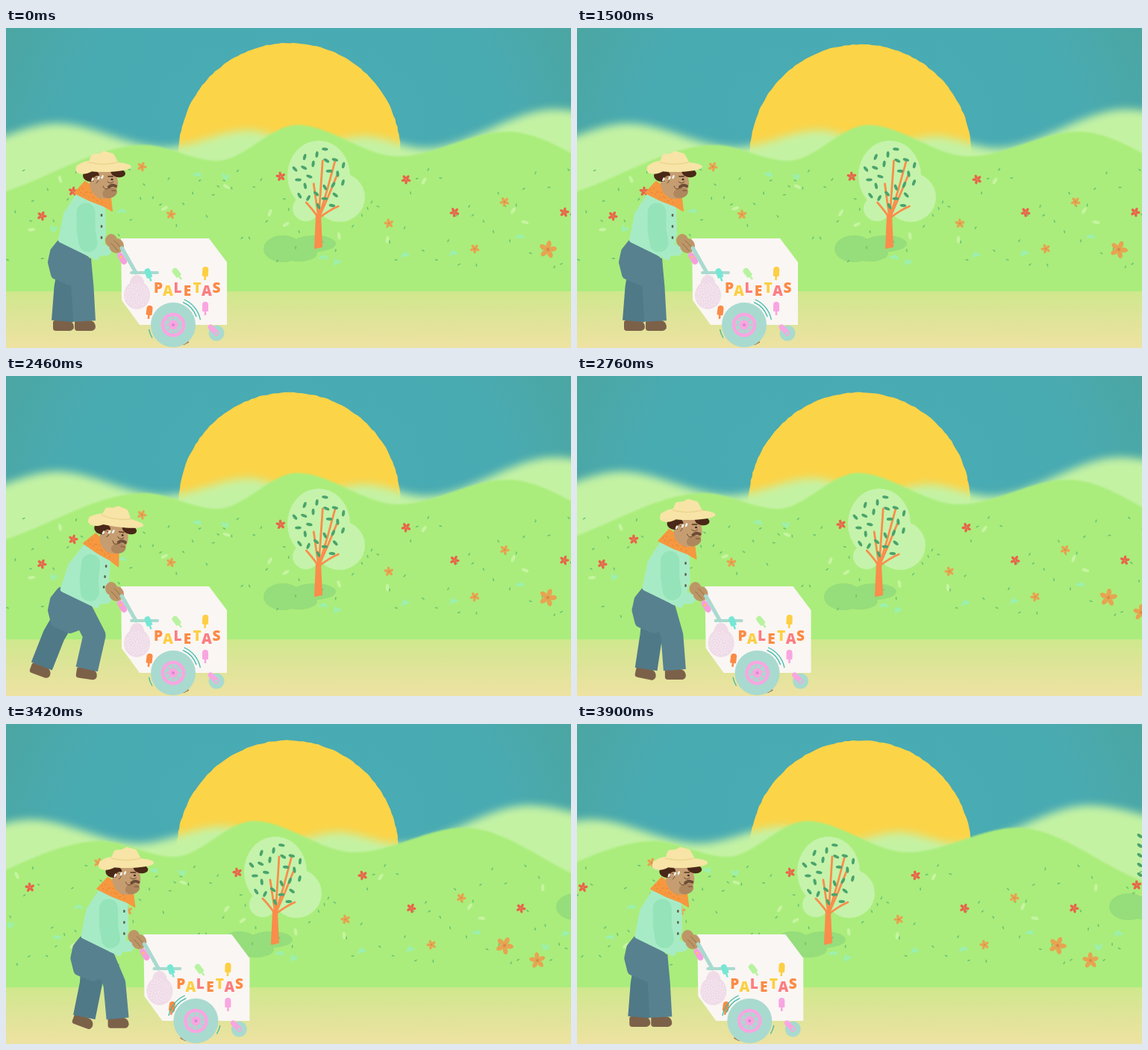
These frames come from a looping animation (757x429 px, 3960 ms). An HTML page with a canvas:

```html
<!DOCTYPE html>
<html lang="es">
<head>
<meta charset="utf-8">
<title>Paletas</title>
<style>
html, body { margin: 0; width: 100%; height: 100%; overflow: hidden; background: #4aabb1 }
canvas { display: block }
</style>
</head>
<body>
<canvas id="stage" width="757" height="429"></canvas>
<script>
const W = 757, H = 429, GROUND = 353, LOOP = 3960, START = 2520;
const c = document.getElementById('stage').getContext('2d');
const mix = (a, b, k) => a + (b - a) * k;
const clamp = k => Math.max(0, Math.min(1, k));
const smooth = k => k * k * (3 - 2 * k);
const ramp = (t, a, b) => smooth(clamp((t - a) / (b - a)));
const rnd = n => { const s = Math.sin(n * 127.1 + 11.7) * 43758.5453; return s - Math.floor(s); };

// Value at x on a line through [x, value] keys
function along(x, keys, ease = k => k) {
  const i = Math.max(1, keys.findIndex(k => k[0] > x));
  const [a, b] = [keys[i - 1], keys[i]];
  return mix(a[1], b[1], ease(clamp((x - a[0]) / (b[0] - a[0]))));
}

function fill(color) { c.fillStyle = color; c.fill(); }
function stroke(color, width, cap = 'round') {
  c.strokeStyle = color; c.lineWidth = width; c.lineCap = cap; c.lineJoin = 'round';
  c.stroke();
}
function trace(pts) { c.beginPath(); pts.forEach(p => c.lineTo(...p)); }
function poly(color, pts, round = 0) {
  trace(pts);
  c.closePath();
  fill(color);
  if (round) stroke(color, round);
}
function line(color, width, pts, cap) { trace(pts); stroke(color, width, cap); }
function bend(color, width, a, mid, b) {
  c.beginPath();
  c.moveTo(...a);
  c.quadraticCurveTo(...mid, ...b);
  stroke(color, width);
}
function oval(color, x, y, rx, ry = rx, rot = 0) {
  c.beginPath();
  c.ellipse(x, y, rx, ry, rot, 0, 7);
  fill(color);
}
function arc(color, width, r, a = 0, b = 7) { c.beginPath(); c.arc(0, 0, r, a, b); stroke(color, width); }
function group(x, y, rot, draw) { c.save(); c.translate(x, y); c.rotate(rot); draw(); c.restore(); }
function shade(gradient, ...colors) {
  colors.forEach((k, i) => gradient.addColorStop(i / (colors.length - 1), k));
  return gradient;
}

// Crests and valleys of the two ranges
const FRONT = [[-60, 230], [185, 157], [283, 178], [390, 130], [525, 172], [672, 139], [880, 218]];
const BACK = [[-80, 165], [68, 128], [212, 160], [325, 137], [405, 158], [480, 145], [562, 161], [735, 109], [900, 140]];
const RED = [[48, 252], [90, 219], [368, 199], [536, 203], [601, 247], [748, 247], [832, 216]];
const ORANGE = [[182, 186], [221, 250], [513, 262], [628, 296], [668, 233], [726, 297, 11], [770, 317, 10]];

function hills(keys, shift, color, blur) {
  c.filter = `blur(${blur}px)`;
  c.beginPath();
  for (let x = -40; x <= W + 40; x += 4) c.lineTo(x, along(x + shift, keys, smooth));
  c.lineTo(W + 40, H + 20);
  c.lineTo(-40, H + 20);
  fill(color);
  c.filter = 'none';
}

function flower(color, x, y, r, rot) {
  group(x, y, rot, () => {
    for (let i = 0; i < 5; i++) {
      const a = i * Math.PI * .4;
      oval(color, Math.cos(a) * r * .6, Math.sin(a) * r * .6, r * .5, r * .3, a);
    }
    oval('#d98a4c', 0, 0, r * .2);
  });
}

function bush(x, y) {
  const color = '#96dd7b';
  oval(color, x - 22, y, 26, 18);
  oval(color, x, y + 6, 24, 11);
  oval(color, x + 20, y - 7, 29, 11);
}

function tree(step) {
  const bark = '#fa8d4b', pale = '#c5f3ab', sway = rnd(step) - .5;
  oval(pale, 419, 198, 42, 47);
  oval(pale, 447, 227, 34, 33);
  oval(pale, 402, 242, 18, 17);
  poly(bark, [[414, 295], [416, 250], [421, 250], [423, 293]], 2);
  [[402, 234], [412, 209], [424, 178], [441, 177], [443, 198], [445, 239]].forEach(([x, y]) =>
    bend(bark, 2.8, [419, 255], [mix(419, x, .55), mix(248, y, .45)], [x + sway, y]));
  // Leaves spread by the golden angle
  for (let i = 3; i < 27; i++) {
    const a = i * 2.4, r = Math.sqrt(i / 27);
    oval('#4aa36d', 420 + Math.cos(a) * 36 * r, 202 + Math.sin(a) * 44 * r, 4.3, 2, .9 + Math.sin(i) + rnd(step + i) * .2);
  }
}

function meadow(shift, step) {
  const scatter = (n, seed, draw) => {
    for (let i = 0; i < n; i++)
      draw((i + rnd(seed + i)) * 870 / n, 188 + rnd(seed + 99 + i) * 135, rnd(seed + 200 + i) * 3 + rnd(step + i) * .3);
  };
  group(-shift, 0, 0, () => {
    bush(393, 296);
    bush(843, 245);
    scatter(105, 5, (x, y, rot) => oval('#6cc474', x, y, 2.2, .9, rot));
    scatter(12, 400, (x, y, rot) => {
      oval('#9cf0ae', x - 2, y, 5, 2, rot);
      oval('#9cf0ae', x + 2, y, 4, 2, rot + 1);
    });
    scatter(14, 800, (x, y, rot) => oval('#c6f4a0', x, y, 5, 2.2, rot));
    const bloom = color => ([x, y, r = 6], i) => flower(color, x, y, r, i + (rnd(step + i) - .5) * .4);
    RED.forEach(bloom('#e9644b'));
    ORANGE.forEach(bloom('#e7a451'));
    tree(step);
    for (let y = 150; y < 210; y += 13) oval('#4aa36d', 836, y, 4, 2, .6);
  });
}

function sun(x, y, step) {
  c.beginPath();
  for (let i = 0; i < 180; i++) {
    const a = i * Math.PI / 90, r = 148.6 + (rnd(i + step * 5) - .5);
    c.lineTo(x + Math.cos(a) * r, y + Math.sin(a) * r);
  }
  fill('#fcd448');
}

function pop(color, x, y, rot) {
  group(x, y, rot, () => {
    c.beginPath();
    c.roundRect(-4, -8, 8, 13, [4, 4, 1, 1]);
    fill(color);
    c.fillRect(-1.3, 4, 2.6, 6);
  });
}

function cart(rolled) {
  const teal = '#a9dacf', pink = '#f8a6e1', paint = ['#fb8b45', '#fccf44', '#fb7d82'];
  poly('#faf6f3', [[154, 282], [272, 282], [296, 314], [296, 398], [179, 398], [155, 365]]);
  line(teal, 5, [[153, 291], [174, 328]]);
  line(teal, 4, [[168, 328], [203, 328]]);
  oval('#efdce8', 175.5, 358, 17.5, 19);
  oval('#efdce8', 175.5, 344, 10, 13);
  for (let i = 0; i < 65; i++) {
    const r = Math.sqrt(i) * 2;
    oval('#faf0f5', 175.5 + Math.cos(i * 2.4) * r, 358 + Math.sin(i * 2.4) * r, .8);
  }
  pop('#76e7d5', 191, 330, -.35);
  pop('#b8f3a0', 229, 329, -.65);
  pop(paint[1], 267, 328, .05);
  pop(pink, 267, 375, 0);
  pop(paint[0], 192, 380, .12);
  c.font = '800 19px "Open Sans", sans-serif';
  c.textAlign = 'center';
  [...'PALETAS'].forEach((ch, i) => {
    c.fillStyle = paint[i % 3];
    c.fillText(ch, 204 + i * 13, 355 + i % 2 * 4);
  });
  // The marks around the wheel flip while it rolls
  group(224, 398, 0, () => {
    if (Math.floor(rolled / 120) % 2) c.scale(-1, 1);
    arc('#3bb9a7', 1.3, 33, -1.15, -.35);
    arc('#3bb9a7', 1.3, 37, -1.15, -.2);
    arc('#3bb9a7', 1.3, 33, 2.6, 2.95);
    line('#a87542', 2, [[14, 26], [20, 23]]);
  });
  oval(teal, 224, 398, 30);
  group(224, 398, rolled / 420, () => {
    arc(pink, 4.5, 14);
    oval(pink, 0, 0, 6.5);
    for (let a = 0; a < 6; a += Math.PI / 4) oval(pink, Math.cos(a) * 9, Math.sin(a) * 9, 1.3);
    oval('#d987cc', 0, 0, 2);
  });
  oval(teal, 282, 409, 10.5);
  line(pink, 7, [[274, 401], [282, 409]]);
  oval(teal, 282, 409, 2);
}

function leg(color, hip, foot, y, lift, knee) {
  group(foot, y, lift, () => {
    c.beginPath();
    c.roundRect(-14, -8, 28, 14, [3, 9, 6, 4]);
    fill('#7c6149');
  });
  line(color, 30, [[hip, 310], [mix(hip, foot, .5) + knee, 348], [foot - 1 + lift * 8, y - 7]], 'butt');
}

function head() {
  const skin = '#c59d70', hair = '#4a2817', ink = '#6b4d37', straw = '#f7e4a6';
  poly('#f6983f', [[92, 221], [106, 206], [140, 229], [142, 245], [130, 238], [112, 231]], 2);
  for (let i = 0; i < 16; i++) oval('#e0762c', 98 + i * 2.2, 217 + i + Math.sin(i * 2.4) * 4, .7);
  oval(skin, 131, 208, 19, 21);
  oval('#ae875e', 139, 221, 10, 7, -.3);
  oval(hair, 114, 198, 11, 8);
  oval(hair, 150, 194, 10, 6, .2);
  oval(skin, 122, 204, 5, 6);
  bend(ink, 1, [120, 200], [127, 203], [121, 208]);
  line(ink, 1.8, [[137, 199], [143, 199]]);
  oval('#3c2b22', 142, 203, 1.6, 1.2);
  bend(ink, 1, [136, 206], [140, 210], [144, 206]);
  bend(ink, 1, [130, 212], [132, 218], [137, 215]);
  bend(ink, 4, [138, 213], [142, 209], [147, 212]);
  line('#8d5d42', 1.4, [[142, 218], [147, 218]]);
  for (const x of [116, 124, 129]) oval('#f2f1e9', x, 221 - x * .15 - (x - 110) * .1, 1.4, 2.8, .4);
  oval(straw, 131, 186, 37, 7);
  oval(straw, 107, 187, 14, 8, -.3);
  poly(straw, [[112, 184], [117, 172], [126, 171], [131, 168], [142, 171], [149, 184]], 6);
  bend('#ead08a', 1.2, [111, 180], [130, 185], [150, 180]);
}

function man(lean, stride) {
  const pants = '#57818f', shirt = '#a7ebc6', skin = '#bd9667';
  // The torso tips forward around the hem
  const tip = ([x, y]) => {
    const k = lean * (312 - y) / 90;
    return [x + 9 * k, y + 6 * k];
  };
  leg('#4f7987', 86, 77 - 31 * lean - 5 * stride, 400 - 4 * lean, .35 * lean + .4 * stride, 7 * stride - 2);
  leg(pants, 99, 106 + 2 * lean + 16 * stride, 400 + 2 * stride, .15 * lean, 15 * lean + 6 * stride);
  poly(pants, [[74, 290], [106, 312], [108, 330], [86, 338], [67, 330], [63, 314], [66, 300]], 14);
  poly(shirt, [[97, 225], [116, 227], [129, 240], [130, 275], [121, 307], [74, 284], [81, 250]].map(tip), 8);
  line(shirt, 15, [[112, 292], [124, 298], [134, 298]]);
  line('#95e3b8', 25, [[107, 247], [107, 270], [110, 288]].map(tip));
  for (let i = 0; i < 3; i++) oval('#5f6148', ...tip([128, 251 + i * 15]), 1.4, 2);
  oval(skin, 141, 285, 8, 9);
  oval(skin, 148, 292, 10, 10);
  for (const x of [141, 145]) bend('#93704c', 1, [x, 430 - x], [x + 4, 433 - x], [x + 9, 440 - x]);
  line('#a9dacf', 5, [[155, 295], [163, 309]]);
  line('#f79fdd', 8, [[153, 305], [158, 313]]);
  oval('#fbc25a', 154, 307, 1.7);
  group(131 + 14 * lean, 205 + 9 * lean, .14 * lean, () => { c.translate(-131, -205); head(); });
}

function draw(t) {
  const step = Math.floor(t / 180), rolled = Math.max(0, t - START);
  const shift = along(t, [[START, 0], [3000, 28], [3420, 58], [LOOP, 85]]);
  const u = rolled / 1470;
  const push = 128 * u * (1 - u);
  const lean = ramp(t, 600, 720) - ramp(t, 960, 1080) + ramp(t, 1680, 1800) - ramp(t, START, 2700);
  const stride = Math.sin(Math.PI * clamp(rolled / 1380));
  c.fillStyle = shade(c.createRadialGradient(378, 190, 150, 378, 190, 450), '#49abb3', '#49abb2', '#4ca59f');
  c.fillRect(0, 0, W, H);
  sun(380 - 3 * stride, 168.6 + 2 * ramp(t, 0, 1500), step);
  hills(BACK, shift * .6, '#c4f2a3', 6);
  hills(FRONT, shift, '#aaed7c', 1);
  meadow(shift, step);
  c.fillStyle = shade(c.createLinearGradient(0, GROUND, 0, H), '#cfe88d', '#dfe499', '#eee2a2');
  c.fillRect(0, GROUND, W, H - GROUND);
  group(push, 0, 0, () => { cart(rolled); man(lean, stride); });
}

const begin = performance.now();
function frame() {
  draw((performance.now() - begin) % LOOP);
  requestAnimationFrame(frame);
}
frame();
</script>
</body>
</html>
```
